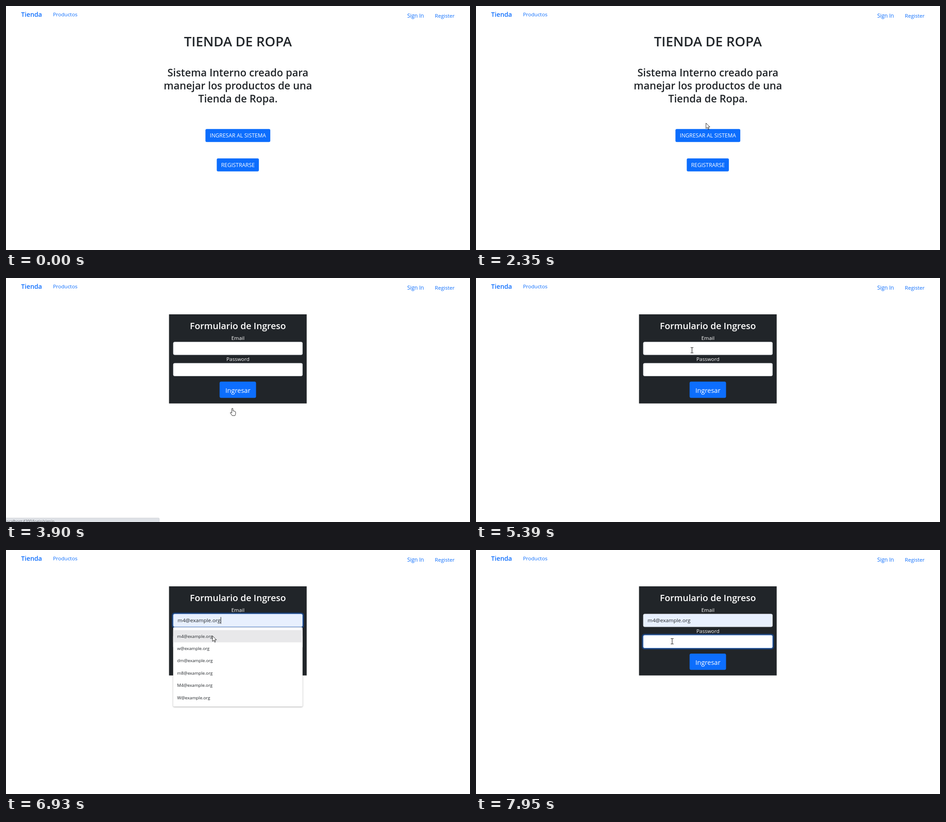
Recreate the animation shown at these times as an HTML page. Size 1029 by 544 pixels, loop 8 s.

```html
<!DOCTYPE html>
<html lang="es">
<head>
<meta charset="utf-8">
<style>
  html, body { margin: 0; width: 100%; height: 100%; overflow: hidden; background: #fff; }
  svg { display: block; width: 1029px; height: 544px; }
  text { font-family: "Open Sans", "Noto Sans", sans-serif; fill: #212529; }
  .mid { text-anchor: middle; }
  .bold { font-weight: 600; }
  .link { fill: #0d6efd; font-size: 11.6px; }
  .white { fill: #fff; }
  .line { font-size: 22.87px; }
  .caps { font-size: 11.95px; }
  .label { font-size: 11.4px; }
  .button { fill: #0d6efd; }
  .field { fill: #fff; stroke: #ced4da; stroke-width: .8; }
  .ring { fill: none; stroke-width: 3; stroke: rgba(13, 110, 253, .35); }
  .edge { fill: none; stroke: #86b7fe; stroke-width: .8; }
  #menu { filter: drop-shadow(0 1px 1.5px rgba(0, 0, 0, .35)); }
  #menu text { font-size: 9.6px; }
  #beam { fill: none; stroke: #fff; mix-blend-mode: difference; }
  #arrow, #hand { fill: #fff; stroke: #000; stroke-width: .85; stroke-linejoin: round; }
</style>
</head>
<body>
<svg viewBox="0 0 1029 544">
  <rect width="1029" height="544" fill="#fff"/>
  <text x="33.5" y="24" class="link bold" style="font-size:14.2px">Tienda</text>
  <text x="104.2" y="23" class="link" style="font-size:11.5px">Productos</text>
  <text x="889.8" y="26" class="link" style="font-size:11.9px">Sign In</text>
  <text x="951" y="26" class="link">Register</text>

  <g id="home">
    <g class="mid bold">
      <text x="514.3" y="90" style="font-size:29.7px">TIENDA DE ROPA</text>
      <text x="514.3" y="157" class="line">Sistema Interno creado para</text>
      <text x="514.3" y="186" class="line">manejar los productos de una</text>
      <text x="514.3" y="215" class="line">Tienda de Ropa.</text>
    </g>
    <rect id="enterRing" x="439.5" y="271.3" width="149.5" height="34.8" rx="5" fill="#98c1fe"/>
    <rect id="enter" class="button" x="442.3" y="274.2" width="143.8" height="29" rx="3"/>
    <text x="514.3" y="293.3" class="mid white caps">INGRESAR AL SISTEMA</text>
    <rect class="button" x="467.4" y="339.8" width="93.4" height="29" rx="3"/>
    <text x="514.3" y="358.8" class="mid white caps">REGISTRARSE</text>
  </g>

  <g id="form">
    <rect x="361.5" y="81" width="305.3" height="198.7" fill="#212529"/>
    <text x="514.3" y="114" class="mid white bold" style="font-size:20px">Formulario de Ingreso</text>
    <text x="514.3" y="137.8" class="mid white label">Email</text>
    <rect id="emailBox" class="field" x="371" y="142.7" width="286.5" height="28.5" rx="3"/>
    <g id="emailFocus">
      <rect class="ring" x="369.2" y="140.9" width="290.1" height="32.1" rx="4.5"/>
      <rect class="edge" x="371" y="142.7" width="286.5" height="28.5" rx="3"/>
    </g>
    <text id="email" x="380.6" y="161.3" style="font-size:11.6px">m4@example.org</text>
    <text x="514.3" y="185.2" class="mid white label">Password</text>
    <rect class="field" x="371" y="190" width="286.5" height="28.5" rx="3"/>
    <g id="passFocus">
      <rect class="ring" x="369.2" y="188.2" width="290.1" height="32.1" rx="4.5"/>
      <rect class="edge" x="371" y="190" width="286.5" height="28.5" rx="3"/>
    </g>
    <rect id="submit" class="button" x="473.7" y="231" width="80.8" height="36.3" rx="3.5"/>
    <text x="514.3" y="255.5" class="mid white" style="font-size:14.5px">Ingresar</text>
    <rect id="caret" width="1" height="15" fill="#111"/>
    <g id="menu">
      <rect x="370.7" y="172.3" width="287" height="176.7" rx="2.5" fill="#fff"/>
      <rect id="row" x="370.7" y="178.5" width="287" height="27.4" fill="#e8e8ea"/>
    </g>
  </g>

  <g id="status">
    <rect id="bar" x="-4" y="535" height="13" rx="2" fill="#dee1e6" stroke="#c9ccd1" stroke-width=".7"/>
    <text x="-1.2" y="546.3" style="font-size:8.7px;fill:#5f6368">localhost:4200/login/signin</text>
  </g>

  <path id="arrow" d="M0 0V12.2L2.9 9.6 4.9 14.1 6.8 13.3 4.8 8.9H8.8Z"/>
  <path id="hand" d="M-1.3 8V1Q-1.3-.5 0-.5T1.3 1V5.2Q3.6 4.5 3.8 6Q5.8 5.6 6 7Q7.4 7 7.2 8.6V11.4Q7 13.4 5.8 15.8H-.4Q-2.2 13-4.4 10.2Q-5 8.6-3.4 8.5Q-2.3 8.8-1.3 10Z"/>
  <path id="beam" d="M-3-6H-.7L0-5.4 .7-6H3M0-5.4V5.4M-3 6H-.7L0 5.4 .7 6H3"/>
</svg>
<script>
const LOOP = 8000;
const el = Object.fromEntries([...document.querySelectorAll('[id]')].map(e => [e.id, e]));

// time, x, y of the pointer's hot spot
const path = [
  [1450, 1000, 145], [1830, 758, 168], [2210, 545, 213], [2280, 527, 237], [2350, 510, 261],
  [2420, 506, 276], [2560, 503, 287], [2890, 502, 291], [4690, 502, 291], [4830, 500, 276],
  [5110, 487, 210], [5390, 479, 161], [6380, 479, 161], [6520, 476, 168], [6660, 466, 182],
  [6800, 460, 190], [6930, 458, 191.5], [7070, 458, 191.5], [7140, 452, 194],
  [7210, 434, 199.5], [7880, 434, 199.5], [7950, 435, 203.5], [LOOP, 435, 203.5]
];

'm4 w dm m8 M4 W'.split(' ').forEach((user, i) => {
  const item = document.createElementNS('http://www.w3.org/2000/svg', 'text');
  item.textContent = user + '@example.org';
  item.setAttribute('x', 379.6);
  item.setAttribute('y', 195.5 + i * 27.4);
  el.menu.append(item);
});

const show = (e, on) => e.style.display = on ? '' : 'none';
const ramp = (t, start) => Math.max(0, Math.min(1, (t - start) / 150));
const within = (v, a, b) => v >= a && v < b;

function pointer(t) {
  const i = path.findIndex(p => p[0] > t);
  if (i < 1) return [-50, -50];
  const [a, b] = [path[i - 1], path[i]];
  const span = b[0] - a[0], steps = Math.round(span / 70) || 1;
  const k = Math.floor((t - a[0]) / span * steps + 1e-6) / steps;
  return [a[1] + (b[1] - a[1]) * k, a[2] + (b[2] - a[2]) * k];
}

function draw(t) {
  const [x, y] = pointer(t);
  const form = t >= 3900, menu = within(t, 6190, 7070);
  const picked = t >= 6650, onSubmit = form && within(y, 231, 267);

  show(el.home, !form);
  show(el.form, form);
  show(el.status, within(t, 2490, 4760));
  el.bar.setAttribute('width', form ? 344 : 118);

  const shade = ramp(t, 2400);
  el.enter.style.fill = `rgb(${13 - 2 * shade},${110 - 16 * shade},${253 - 38 * shade})`;
  el.enterRing.style.opacity = ramp(t, 3450);
  el.submit.style.fill = onSubmit ? '#0b5ed7' : '';

  el.emailFocus.style.opacity = ramp(t, 6080) - ramp(t, 7260);
  el.passFocus.style.opacity = ramp(t, 7260);
  el.emailBox.style.fill = picked ? '#e8f0fe' : '';
  show(el.email, picked);
  show(el.menu, menu);
  show(el.row, picked);

  const inPass = t >= 7280;
  show(el.caret, within(t, 6190, 7880));
  el.caret.setAttribute('x', picked && !inPass ? 381 + el.email.getComputedTextLength() : 381);
  el.caret.setAttribute('y', inPass ? 197 : 149.5);

  const overField = form && !menu && (within(y, 142, 171) || within(y, 190, 219))
    || menu && y < 172;
  const overButton = form ? onSubmit || t < 4760 : y > 274;
  const kind = overField ? 'beam' : overButton ? 'hand' : 'arrow';
  for (const name of ['arrow', 'hand', 'beam']) {
    show(el[name], name === kind);
    el[name].setAttribute('transform', `translate(${x} ${y})`);
  }
}

function tick() {
  draw(performance.now() % LOOP);
  requestAnimationFrame(tick);
}
tick();
</script>
</body>
</html>
```
